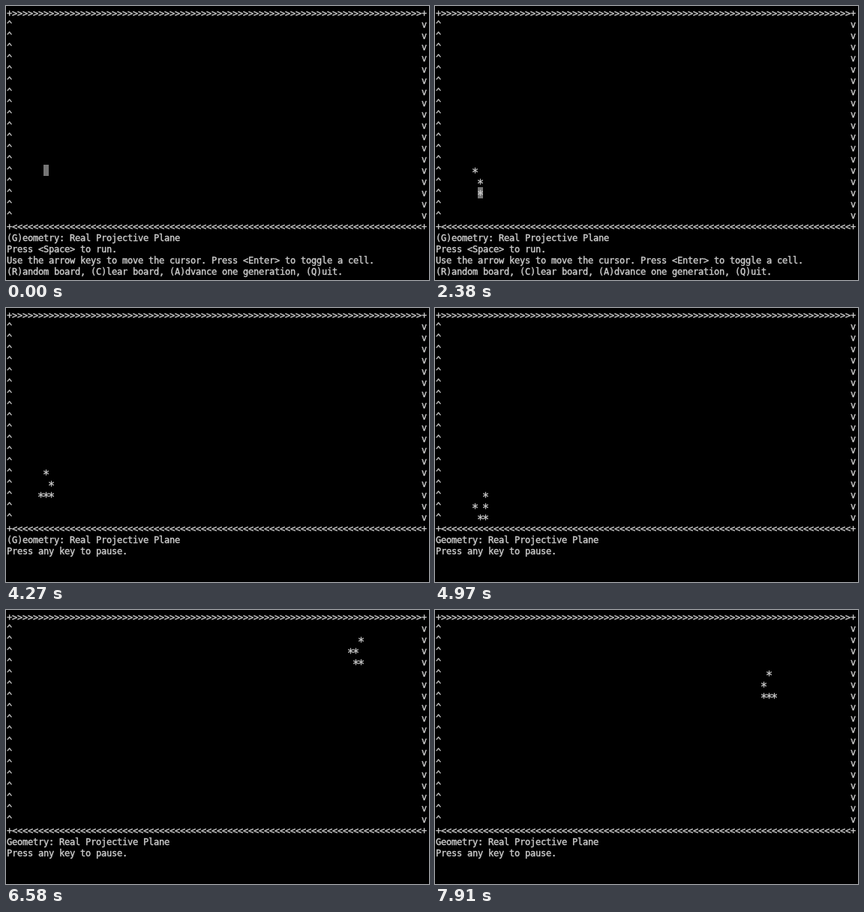
Recreate the animation shown at these times as an HTML page with a canvas. Size 564x366 px, loop 8 s.

```html
<!DOCTYPE html>
<html lang="en">
<head>
<meta charset="utf-8">
<title>Life on a projective plane</title>
<style>
html, body { margin: 0; width: 100%; height: 100%; overflow: hidden; background: #000; }
canvas { display: block; }
</style>
</head>
<body>
<canvas id="stage" width="564" height="366"></canvas>
<script>
const ctx = document.getElementById('stage').getContext('2d');
const LOOP = 8000, TICK = 70;
const CW = 7, CH = 15, LEFT = 1, TOP = 2;
const COLS = 78, ROWS = 18;
const FONT = '"DejaVu Sans Mono", "Liberation Mono", monospace';
const INK = '#cbcbcb', CURSOR = '#757575';

// Editing keys: time, then a cursor move or a toggle
const keys = [
  [910, 'toggle'], [1400, 'right'], [1680, 'down'],
  [1960, 'toggle'], [2170, 'down'], [2380, 'toggle'],
  [3150, 'left'], [3290, 'toggle'], [3500, 'left'], [3640, 'toggle']
];
const moves = { right: [1, 0], left: [-1, 0], down: [0, 1] };
const RUN = 4270, RUNNING = RUN + TICK;
// Ticks that pass before each new generation
const pace = '121212112121121121212112121212121121';

const id = (c, r) => r * 100 + c;

// Both pairs of edges are glued with a twist
function glue(c, r) {
  if (r < 1 || r > ROWS) {
    r = r < 1 ? ROWS : 1;
    c = COLS + 1 - c;
  }
  if (c < 1 || c > COLS) {
    c = c < 1 ? COLS : 1;
    r = ROWS + 1 - r;
  }
  return id(c, r);
}

function advance(live) {
  const next = new Set();
  for (let r = 1; r <= ROWS; r++) {
    for (let c = 1; c <= COLS; c++) {
      let n = 0;
      for (let dr = -1; dr <= 1; dr++) {
        for (let dc = -1; dc <= 1; dc++) {
          if ((dr || dc) && live.has(glue(c + dc, r + dr))) n++;
        }
      }
      if (n === 3 || (n === 2 && live.has(id(c, r)))) next.add(id(c, r));
    }
  }
  return next;
}

function edit(t) {
  const live = new Set();
  let c = 7, r = 14;
  for (const [at, key] of keys) {
    if (t < at) break;
    if (key === 'toggle') {
      if (!live.delete(id(c, r))) live.add(id(c, r));
    } else {
      c += moves[key][0];
      r += moves[key][1];
    }
  }
  return { live, c, r };
}

const generations = [{ at: 0, live: edit(RUN).live }];
let when = RUNNING;
for (const ticks of pace) {
  when += ticks * TICK;
  const last = generations[generations.length - 1];
  generations.push({ at: when, live: advance(last.live) });
}

// A hairline outline gives the terminal's heavier strokes
function glyph(ch, x, y) {
  ctx.fillText(ch, x, y);
  ctx.strokeText(ch, x, y);
}

function print(text, c, r) {
  for (const ch of text) {
    if (ch !== ' ') glyph(ch, LEFT + c * CW, TOP + r * CH + 12);
    c++;
  }
}

function drawStars(live) {
  ctx.font = '15px ' + FONT;
  ctx.textAlign = 'center';
  const m = ctx.measureText('*');
  const dy = 8 + (m.actualBoundingBoxAscent - m.actualBoundingBoxDescent) / 2;
  for (const cell of live) {
    const c = cell % 100, r = Math.floor(cell / 100);
    glyph('*', LEFT + c * CW + 3.5, TOP + r * CH + dy);
  }
}

function drawText(lines) {
  ctx.font = '12px ' + FONT;
  ctx.textAlign = 'left';
  print('+' + '>'.repeat(COLS) + '+', 0, 0);
  for (let r = 1; r <= ROWS; r++) {
    print('^', 0, r);
    print('v', COLS + 1, r);
  }
  print('+' + '<'.repeat(COLS) + '+', 0, ROWS + 1);
  lines.forEach((line, i) => print(line, 0, ROWS + 2 + i));
}

function draw(t) {
  ctx.fillStyle = '#000';
  ctx.fillRect(0, 0, 564, 366);
  const title = (t < RUNNING ? '(G)eometry' : 'Geometry') + ': Real Projective Plane';
  let live, lines;
  if (t < RUN) {
    const state = edit(t);
    live = state.live;
    ctx.fillStyle = CURSOR;
    ctx.fillRect(LEFT + state.c * CW, TOP + state.r * CH, CW, CH);
    lines = [
      title,
      'Press <Space> to run.',
      'Use the arrow keys to move the cursor. Press <Enter> to toggle a cell.',
      '(R)andom board, (C)lear board, (A)dvance one generation, (Q)uit.'
    ];
  } else {
    for (const g of generations) if (t >= g.at) live = g.live;
    lines = [title, 'Press any key to pause.'];
  }
  ctx.fillStyle = ctx.strokeStyle = INK;
  ctx.lineWidth = 0.4;
  ctx.lineJoin = 'round';
  drawText(lines);
  drawStars(live);
}

const start = performance.now();
function frame() {
  draw((performance.now() - start) % LOOP);
  requestAnimationFrame(frame);
}
frame();
</script>
</body>
</html>
```
